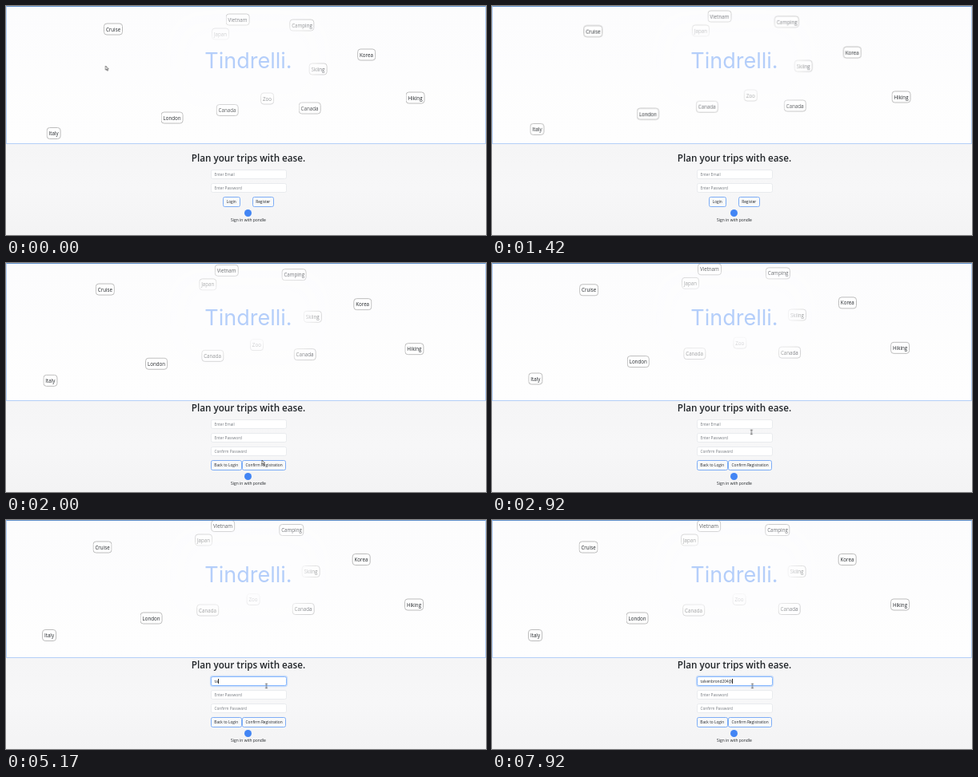
Write an HTML page that moves like this. It is 600x287 px and loops after 8 s.

```html
<!DOCTYPE html>
<html lang="en">
<head>
<meta charset="utf-8">
<title>Trip planner</title>
<style>
  * { box-sizing: border-box; }
  html, body { margin: 0; width: 100%; height: 100%; overflow: hidden; }
  body {
    position: relative;
    background: linear-gradient(#f5f5f6 60%, #f7f7f8 80%, #f3f3f4);
    color: #212529;
    font-family: "Open Sans", "Noto Sans", sans-serif;
  }
  .hero {
    position: absolute; left: 0; top: 0; width: 600px; height: 173px;
    border: 1px solid #b4cff7; border-top-color: #6090cc;
    background: linear-gradient(#fcfcfd, #fefefe);
    overflow: hidden;
  }
  .tag {
    position: absolute; left: -1px; top: -1px; height: 15px; padding: 0 1.9px;
    border: .8px solid #bcbcbc; border-radius: 4px; background: #fff;
    font-size: 6.2px; line-height: 13.4px; white-space: nowrap;
    transform: translate(-50%, -50%);
    animation: drift 8s linear infinite;
  }
  /* x, y: start; dx, dy: whole shift; fx, fy: share of it done by the first stop */
  @keyframes drift {
    0%, 8.375% { translate: var(--x) var(--y); animation-timing-function: cubic-bezier(.4, .1, .7, .8); }
    17.75% {
      translate: calc(var(--x) + var(--dx) * var(--fx)) calc(var(--y) + var(--dy) * var(--fy));
      animation-timing-function: cubic-bezier(.33, .4, .6, .85);
    }
    25% {
      translate: calc(var(--x) + var(--dx) * .75) calc(var(--y) + var(--dy) * .81);
      animation-timing-function: cubic-bezier(.2, .5, .42, 1);
    }
    49%, 100% { translate: calc(var(--x) + var(--dx)) calc(var(--y) + var(--dy)); }
  }
  /* soft haze that hides tags passing behind the title */
  .haze {
    position: absolute; left: 248px; top: 53px; width: 107px; height: 30px;
    border-radius: 4px; background: #fdfdfe; box-shadow: 0 0 40px 35px #fdfdfe;
  }
  h1 {
    position: absolute; left: 202px; top: 48px; width: 200px; margin: 0;
    font: 400 27px/40px Inter, Roboto, sans-serif;
    color: #b4cefa; text-align: center; white-space: nowrap;
  }
  .form {
    position: absolute; left: 203px; top: 181.5px; width: 200px;
    display: flex; flex-direction: column; align-items: center;
    white-space: nowrap;
  }
  .form.signup { top: 173px; }
  h2 { margin: 0 0 7px; font-size: 11.7px; line-height: 16px; font-weight: 600; }
  .field {
    width: 95px; height: 12px; margin-bottom: 5px; padding-left: 4px;
    border: 1px solid #e9ebee; border-radius: 2.5px; background: #fff;
    font-size: 4.75px; line-height: 10px; color: #74797f;
  }
  .confirm { display: none; }
  .signup .confirm { display: block; }
  .email { animation: focus 8s linear infinite; }
  .email.typed { color: #212529; }
  @keyframes focus {
    0%, 47.5% { border-color: #e9ebee; box-shadow: 0 0 0 0 #0d6efd00; }
    49.3%, 99.99% { border-color: #86b7fe; box-shadow: 0 0 0 1.2px #0d6efd30; }
    100% { border-color: #e9ebee; box-shadow: 0 0 0 0 #0d6efd00; }
  }
  .caret {
    display: inline-block; width: .7px; height: 6px; margin-right: -.7px;
    background: #222; vertical-align: -1.2px;
  }
  .buttons { display: flex; gap: 15px; }
  .signup .buttons { gap: 0; }
  .button {
    height: 13px; padding: 0 3.7px; border: 1px solid #7dadf6; border-radius: 2.5px;
    background: #f8f9fa; font-size: 4.8px; line-height: 11px;
  }
  .logo { width: 9px; height: 9px; margin: 3px 1px 0 0; border-radius: 50%; background: #4285f4; }
  .sso { font-size: 4.95px; line-height: 8px; }

  .pointer { position: absolute; left: 0; top: 0; overflow: visible; }
  #arrow { animation: point 8s ease-in-out infinite, arrow 8s step-end infinite; }
  #beam { animation: point 8s ease-in-out infinite, beam 8s step-end infinite; }
  @keyframes point {
    0%, 8.375% { translate: 124.5px 75px; }
    18.75% { translate: 312px 195px; }
    22.5%, 26% { translate: 320px 247px; }
    31.25% { translate: 324px 213px; }
    47.5%, 100% { translate: 325.5px 208px; }
  }
  @keyframes arrow {
    0%, 18.75% { opacity: 1; }
    8.375%, 30.25%, 100% { opacity: 0; }
  }
  @keyframes beam {
    0% { opacity: 0; }
    30.25%, 100% { opacity: 1; }
  }
</style>
</head>
<body>
<div class="hero">
  <div class="haze"></div>
  <h1>Tindrelli.</h1>
</div>
<div class="form">
  <h2>Plan your trips with ease.</h2>
  <div class="field email"><span class="caret"></span><span class="value">Enter Email</span></div>
  <div class="field">Enter Password</div>
  <div class="field confirm">Confirm Password</div>
  <div class="buttons"><div class="button">Login</div><div class="button">Register</div></div>
  <div class="logo"></div>
  <div class="sso">Sign in with pondle</div>
</div>
<svg class="pointer" id="arrow" width="5" height="7"><path d="M0 0V5.2L1.2 4.2L2.1 6.2L3 5.8L2.1 3.9H3.7Z" fill="#fff" stroke="#222" stroke-width=".6"/></svg>
<svg class="pointer" id="beam" width="4" height="6"><path d="M-1.3-2.7H1.3M0-2.7V2.7M-1.3 2.7H1.3" fill="none" stroke="#333" stroke-width=".7"/></svg>
<script>
  const LOOP = 8000;
  const $ = (q) => document.querySelector(q);

  // label, start centre, shift
  const tags = [
    ["Cruise", 134, 29, -13.5, 5],
    ["Vietnam", 289.5, 17, -18.5, -9.5],
    ["Japan", 268, 35, -21, -10],
    ["Camping", 370, 24, -13, -11.5],
    ["Korea", 450.5, 61, -6.5, -11.5],
    ["Skiing", 390, 79, -9, -14.5],
    ["Zoo", 326.5, 116, -17.5, -16.5],
    ["Canada", 276.5, 130.5, -24.5, -17.5],
    ["Canada", 379.5, 128, -8, -16.5],
    ["Hiking", 511.5, 115, -1.5, -9],
    ["London", 207.5, 140, -26, -17],
    ["Italy", 59.5, 159.5, -5.5, -15],
  ];
  for (const [label, x, y, dx, dy] of tags) {
    const el = document.createElement("div");
    el.className = "tag";
    el.textContent = label;
    // tags on the left and near the top set off sooner
    const fx = 0.32 - 0.28 * Math.tanh((x - 275) / 100);
    const fy = 0.65 - x / 1500 - y / 600;
    const px = { x, y, dx, dy };
    for (const k in px) el.style.setProperty("--" + k, px[k] + "px");
    el.style.setProperty("--fx", fx);
    el.style.setProperty("--fy", fy);
    $(".hero").insertBefore(el, $(".haze"));
  }

  const SIGNUP_AT = 1830, CARET_AT = 3980, BLINK = 530;
  const email = "talvenbrond204@k";
  // typing bursts: start, gap between keys, number of keys
  const bursts = [[4580, 165, 2], [5165, 160, 2], [6415, 83, 8], [7245, 220, 4]];
  const keys = bursts.flatMap(([start, gap, n]) => Array.from({ length: n }, (_, i) => start + i * gap));

  function setText(el, text) {
    if (el.textContent !== text) el.textContent = text;
  }

  const form = $(".form"), field = $(".email"), value = $(".value"), caret = $(".caret");
  const [leftButton, rightButton] = document.querySelectorAll(".button");

  function draw(now) {
    const t = now % LOOP;
    const signup = t >= SIGNUP_AT;
    form.classList.toggle("signup", signup);
    setText(leftButton, signup ? "Back to Login" : "Login");
    setText(rightButton, signup ? "Confirm Registration" : "Register");

    const count = keys.filter((k) => k <= t).length;
    setText(value, count ? email.slice(0, count) : "Enter Email");
    field.classList.toggle("typed", count > 0);
    if (count) value.after(caret);
    else value.before(caret);
    const since = t - (count ? keys[count - 1] : CARET_AT);
    caret.style.visibility = since >= 0 && since % (2 * BLINK) < BLINK ? "visible" : "hidden";
  }

  // share one clock with the CSS animations
  const clock = document.getAnimations()[0];
  function tick() {
    draw(clock && clock.currentTime !== null ? clock.currentTime : performance.now());
    requestAnimationFrame(tick);
  }
  tick();
</script>
</body>
</html>
```
